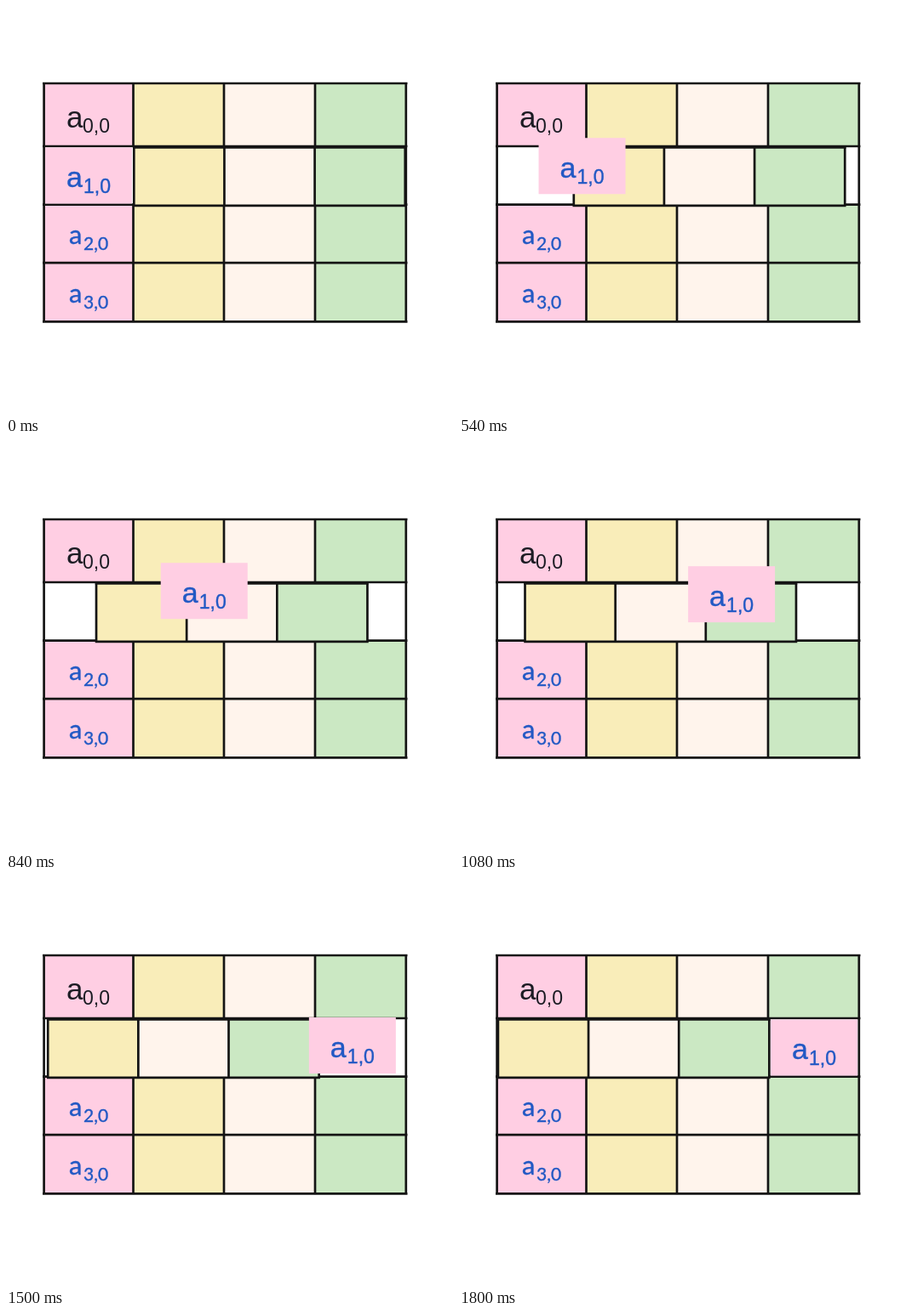
An HTML page for the animation above (1860 ms loop, 525 px wide and 480 px high).

```html
<!DOCTYPE html>
<html lang="en">
<head>
<meta charset="utf-8">
<title>Row shift</title>
<style>
  html, body { margin: 0; width: 100%; height: 100%; overflow: hidden; background: #fff; }
  svg { display: block; width: 525px; height: 480px; }
  .line { fill: none; stroke: #141414; stroke-width: 2.7; }
  .pink { fill: #ffcee3; }
  .yellow { fill: #f9edb9; }
  .cream { fill: #fff4ec; }
  .green { fill: #cbe8c3; }
  text { font: 35px "Liberation Sans", Arial, sans-serif; fill: #1c1c24; }
  .sub { font-size: 23px; }
  .blue { fill: #2259c4; stroke: #2259c4; stroke-width: .4; }
  .lato { font-family: Lato, Carlito, sans-serif; font-size: 31px; }
  .lato .sub { font-size: 21px; }
</style>
</head>
<body>
<svg viewBox="0 0 525 480">
  <g id="grid"></g>
  <path class="line" d="M43 91H471.5M43 165H471.5M43 233.7H471.5M43 302.2H471.5M43 371.3H471.5M44.6 91V371M469.8 91V371"/>
  <text x="71" y="143">a<tspan class="sub" x="90" y="149">0,0</tspan></text>
  <text class="blue lato" x="74" y="279.5">a<tspan class="sub" x="91" y="287">2,0</tspan></text>
  <text class="blue lato" x="74" y="348.5">a<tspan class="sub" x="91" y="356">3,0</tspan></text>
  <g id="strip"></g>
  <g id="tile">
    <rect class="pink" x="46" y="166.5" width="102" height="66"/>
    <text class="blue" x="71" y="213" style="font-size:34px">a<tspan class="sub" x="91" y="220">1,0</tspan></text>
  </g>
</svg>
<script>
const LOOP = 1860, STEP = 60;
const START = 105, MOVE = 1596;
const COLORS = ['pink', 'yellow', 'cream', 'green'];
const $ = id => document.getElementById(id);

const cell = (color, x, y, w, h) =>
  `<rect class="${color}" x="${x}" y="${y}" width="${w}" height="${h}"/>`;
const line = d => `<path class="line" d="${d}"/>`;

function buildGrid() {
  const xs = [44.6, 149.5, 256, 363, 469.8];
  const rows = [[91, 165], [233.7, 302.2], [302.2, 371.3]];
  let out = '';
  for (const [top, bottom] of rows) {
    COLORS.forEach((c, i) => out += cell(c, xs[i], top, xs[i + 1] - xs[i], bottom - top));
    for (const x of xs.slice(1, 4)) out += line(`M${x} ${top}V${bottom}`);
  }
  $('grid').innerHTML = out;
}

function buildStrip() {
  const left = 150.3, w = 106.15, top = 166.3, bottom = 234.8;
  let out = '';
  COLORS.slice(1).forEach((c, i) => out += cell(c, left + i * w, top, w, bottom - top));
  for (let i = 0; i < 4; i++) out += line(`M${left + i * w} ${top}V${bottom}`);
  out += line(`M${left - 1.3} ${top}H${left + 3 * w + 1.3}M${left - 1.3} ${bottom}H${left + 3 * w + 1.3}`);
  $('strip').innerHTML = out;
}

const ease = u => u < .5 ? 2 * u * u : 1 - 2 * (1 - u) ** 2;
const move = (id, x, y) => $(id).setAttribute('transform', `translate(${x.toFixed(2)} ${y.toFixed(2)})`);

function draw() {
  const t = Math.floor(performance.now() % LOOP / STEP) * STEP;
  const p = ease(Math.min(1, Math.max(0, (t - START) / MOVE)));
  move('strip', -104.4 * p, 0);
  move('tile', 320 * p, -25 * Math.sin(Math.PI * p));
  requestAnimationFrame(draw);
}

buildGrid();
buildStrip();
draw();
</script>
</body>
</html>
```
